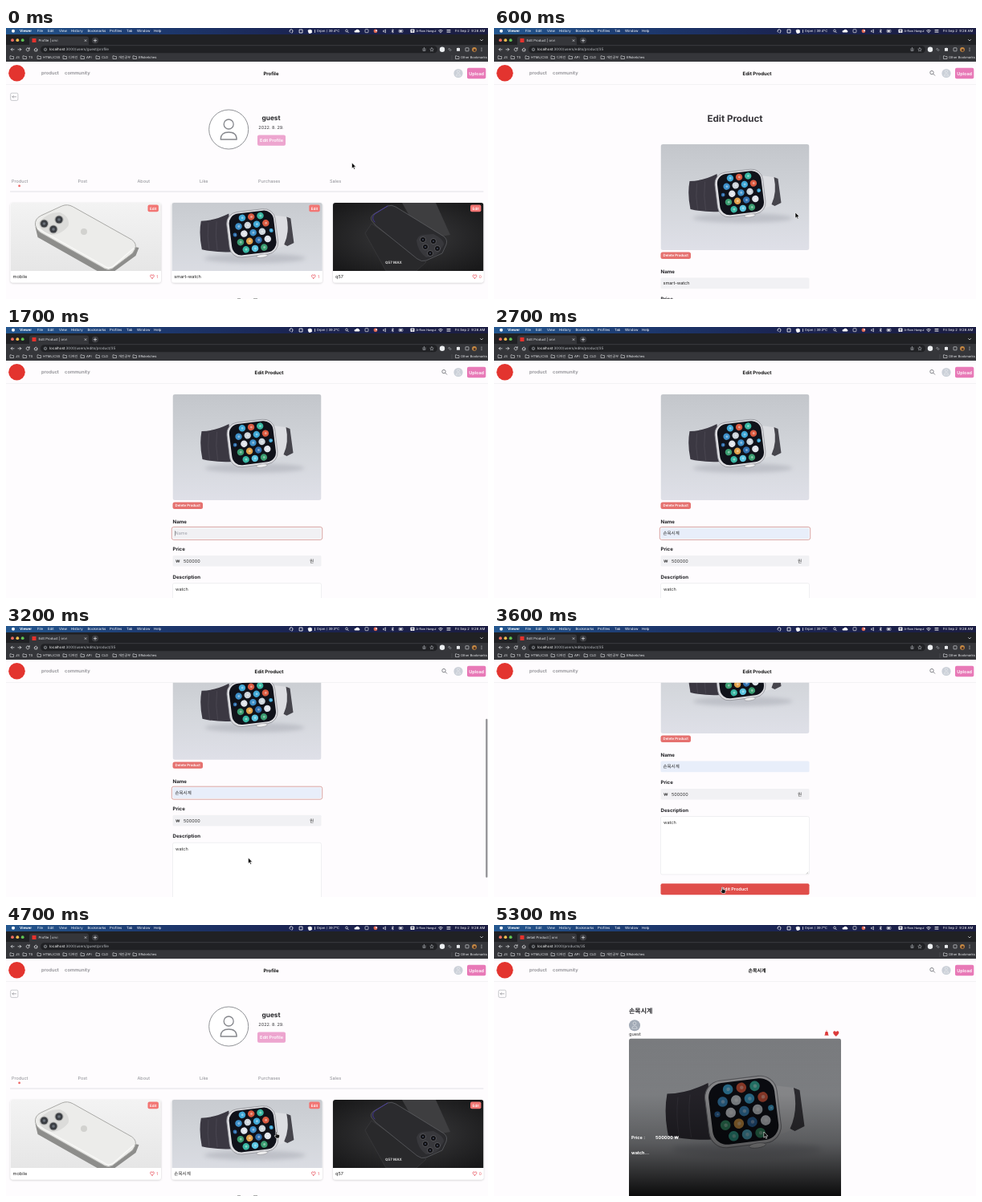
Animation of 600x338 px, one loop 5500 ms. Source, as an HTML page:

```html
<!DOCTYPE html>
<html lang="en">
<head>
<meta charset="utf-8">
<title>Shop profile demo</title>
<style>
  html, body { margin: 0; width: 100%; height: 100%; overflow: hidden; background: #fefcfe; }
  svg { display: block; width: 100vw; height: 100vh; font-family: Inter, "Noto Sans CJK KR", "Noto Sans CJK", sans-serif; }
  svg svg { width: auto; height: auto; }
  text { white-space: pre; text-rendering: geometricPrecision; }
  .b { font-weight: 700; }
  .s { font-weight: 600; }
  .m { text-anchor: middle; }
</style>
</head>
<body>
<svg id="stage" viewBox="0 0 600 338"></svg>
<script>
const LOOP = 5500, STEP = 100;
const stage = document.getElementById('stage');

const text = (x, y, size, fill, str, cls = '', id = '') =>
  `<text x="${x}" y="${y}" font-size="${size}" fill="${fill}" class="${cls}" id="${id}">${str}</text>`;
const rect = (x, y, w, h, fill, r = 0, extra = '') =>
  `<rect x="${x}" y="${y}" width="${w}" height="${h}" fill="${fill}" rx="${r}" ${extra}/>`;
const dot = (x, y, r, fill, extra = '') => `<circle cx="${x}" cy="${y}" r="${r}" fill="${fill}" ${extra}/>`;
const line = (d, stroke, w = .7, extra = '') =>
  `<path d="${d}" fill="none" stroke="${stroke}" stroke-width="${w}" stroke-linecap="round" stroke-linejoin="round" ${extra}/>`;
const shape = (d, fill, extra = '') => `<path d="${d}" fill="${fill}" ${extra}/>`;
const at = (x, y, body, scale = 1) => `<g transform="translate(${x} ${y}) scale(${scale})">${body}</g>`;
const stops = list => list.map(([o, c, a = 1]) => `<stop offset="${o}" stop-color="${c}" stop-opacity="${a}"/>`).join('');
const gradient = (id, ...list) => `<linearGradient id="${id}" x2="0" y2="1">${stops(list)}</linearGradient>`;
const heartPath = 'M0 2.3C-3.6-.2-2.4-2.4-1-2.1Q-.3-2 0-1.3Q.3-2 1-2.1C2.4-2.4 3.6-.2 0 2.3Z';
const person = (x, y, s) => at(x, y, dot(0, -6.5, 6, 'none', 'stroke="currentColor" stroke-width="1.3"') +
  line('M-10 12.5Q-10 3.5 0 3.5Q10 3.5 10 12.5Z', 'currentColor', 1.3), s);

// Photographs, reduced to flat shapes
function watchFace() {
  const colors = ['#3fa7d6', '#dfe3ea', '#3a9c70', '#d9593f', '#3d8fc9', '#e0a04a', '#38b6a2', '#ccd3da', '#2f6fae', '#5bc4e0'];
  let out = '';
  for (let row = -2; row <= 2; row++) {
    const count = row % 2 ? 4 : 3 + (row === 0) * 2;
    for (let i = 0; i < count; i++) {
      const x = (i - (count - 1) / 2) * 11.2, edge = Math.abs(x) > 20;
      const c = colors[(i * 3 + (row + 2) * 4) % colors.length];
      out += dot(x, row * 9.8, edge ? 2.4 : 4.2, c) + dot(x + .3, row * 9.8, edge ? .8 : 1.5, '#fff', 'opacity=".4"');
    }
  }
  return out;
}
const watchPhoto = rect(0, 0, 185, 133, 'url(#studio)') +
  '<ellipse cx="102" cy="92" rx="62" ry="6" fill="#9a9ca6" opacity=".4" filter="url(#blur)"/>' +
  shape('M124 39L141 41Q146 58 148 73L129 80Z', '#dcdde1') +
  shape('M141 41L146 43L150 73L142 77L138 75Q145 60 141 41Z', '#46454c') +
  shape('M36 46Q52 46 70 37L74 84Q54 85 37 81Q33 62 36 46Z', '#3b3842') +
  line('M45 49Q43 65 46 81M55 47Q53 64 56 82', '#524f5a', .6) +
  `<g transform="translate(99 61) rotate(-7)">${rect(-30, -28, 60, 56, '#dcdce0', 14, 'stroke="#88898f" stroke-width=".7"')}` +
  `${rect(-27, -26, 55, 51.5, '#10121a', 12)}${at(1, -.5, watchFace())}</g>` +
  '<ellipse cx="111" cy="89" rx="7" ry="2" fill="#eeeeef" stroke="#85868b" stroke-width=".5" transform="rotate(-8 111 89)"/>';

const lens = (x, y) => dot(x, y, 5.6, '#b0b0ae') + dot(x, y, 4.5, '#3b3e43') + dot(x, y, 1.8, '#697079');
const whitePhone = rect(0, 0, 187.5, 85, 'url(#pale)') +
  shape('M31 30L34 43L108 85H130L156 66L160 56L37 34Z', '#8d8d8b') +
  shape('M31 28Q30 20 38 16L64 4Q71 1 78 5L151 46Q158 51 155 58L152 63L127 82Q122 85 117 82L37 37Q32 33 31 28Z',
    '#ececea', 'stroke="#a9a9a6" stroke-width="1"') +
  line('M34 32L119 80Q123 82 128 79L153 57', '#fafaf8', 1.2) +
  shape('M35 25Q46 11 62 12Q75 18 72 29Q63 40 51 40Q37 36 35 25Z', '#dcdcda') +
  lens(42, 26) + lens(53.5, 33) + lens(60.5, 21) + dot(91.5, 36, 4, '#d2d2cf');
const blackPhone = rect(0, 0, 187.5, 85, 'url(#slate)') +
  shape('M86 0L128 0L146 40L112 46Z', '#3e3e40') +
  shape('M40 38L48 26L116 74L104 85L66 85Z', '#29292b', 'stroke="#4a4a4c" stroke-width=".4"') +
  text(65, 76, 4.5, '#d8d8d8', 'Q57 MAX', 'b') +
  shape('M48 22Q46 17 51 14L68 4Q73 2 78 5L138 42Q143 46 141 52L136 63L116 72Q110 74 105 70L53 28Z',
    '#2b2b2e', 'stroke="#5c5d61" stroke-width=".8"') +
  line('M52 24Q47 19 52 14L68 4', '#4b3bb0', .8) +
  shape('M104 47Q106 41 112 40L125 39Q138 45 138 52L132 62Q126 68 116 68Q105 60 104 47Z', '#38383c') +
  [[112, 46], [115, 55], [121, 63], [125, 48], [130, 57]].map(([x, y]) =>
    dot(x, y, 3.5, '#0f0f12', 'stroke="#77777c" stroke-width=".6"') + dot(x, y, 1.1, '#42485a')).join('');

function browser() {
  const menu = [['File', 39], ['Edit', 52], ['View', 66], ['History', 81], ['Bookmarks', 101.5], ['Profiles', 129],
    ['Tab', 150], ['Window', 163], ['Help', 184]];
  const marks = [['JS', 12], ['TS', 28], ['HTML/CSS', 46], ['디자인', 78], ['API', 100], ['CLD', 119], ['개인공부', 140], ['ERsketches', 165]];
  const folder = x => shape(`M${x} 34.8h1.7l.6.7h2.2v3h-4.5z`, 'none', 'stroke="#dadce0" stroke-width=".6"');
  const w = '#e8eaed', g = '#bdc1c6';
  const menuText = (x, size, str, cls, id) => text(x, 5.2, size, '#fff', str, cls, id);
  return rect(0, 0, 600, 8.5, 'url(#menu)') + dot(9, 3.7, 2, '#fff') + menuText(17, 4.4, 'Viewer', 'b') +
    menu.map(([s, x]) => menuText(x, 4.3, s)).join('') +
    line('M354 5.5a2 2 0 1 1 3-1.5l-1 2.2M365.5 2h3.5v4h-3.5zM377 6l-1-3 2-1 2.5 1-1 3z', '#fff', .8) +
    shape('M376 3l4-1 1 4-4 .5z', '#fff') + line('M384.5 2.5v3', '#fff') + menuText(387, 4.2, '', '', 'temp') +
    dot(424, 3.4, 1.4, 'none', 'stroke="#fff" stroke-width=".6"') + line('M425 4.5l1.3 1.3', '#fff') +
    shape('M434.5 5.6h5a1.3 1.3 0 0 0 0-2.5a2.3 2.3 0 0 0-4.2 0a1.3 1.3 0 0 0-.8 2.5z', '#fff') +
    rect(447, 1.7, 4, 4, 'none', .7, 'stroke="#fff" stroke-width=".6"') + dot(460, 3.8, 2.4, '#e46a52') + dot(461, 3.2, 1, '#dfe6ff') +
    line('M470 3.2h1l1.5-1.3v4L471 4.7h-1zM480 2.7l2.5 2.3-1.2 1v-4.4l1.2 1L480 5', '#fff', .6) +
    rect(489, 2.2, 5, 3.2, 'none', .7, 'stroke="#fff" stroke-width=".5"') + rect(489.8, 2.9, 3, 1.8, '#fff') +
    rect(503.5, 1.4, 5, 4.6, '#fff', .8) + text(506, 5, 3.4, '#1c2144', '한', 's m') +
    menuText(510.5, 3.7, 'A-Row Hangul') +
    line('M538.5 3.2q2.5-2 5 0M539.6 4.4q1.4-1 2.8 0', '#fff') + dot(541, 5.6, .6, '#fff') +
    line('M549 2.7h4M549 5h4', '#fff', 1) + menuText(559, 4.25, 'Fri Sep 2  9:26 AM') +
    rect(0, 8, 600, 13.5, '#202124') + dot(8, 15.2, 1.9, '#ed6a5e') + dot(14.3, 15.2, 1.9, '#f4bf4f') + dot(20.7, 15.2, 1.9, '#61c554') +
    rect(29, 10.5, 74, 13, '#35363a', 3) + rect(32.5, 13, 5, 5, '#e5322d') + text(40.5, 17.2, 4.2, w, '', '', 'tab') +
    line('M98 14.6l2 2M100 14.6l-2 2', w, .6) + dot(111, 15.6, 4.1, '#3a3b3f') + line('M109.3 15.6h3.4M111 13.9v3.4', w, .7) +
    line('M590.5 14.5l1.5 1.5 1.5-1.5', w) + rect(0, 21, 600, 21, '#35363a') +
    line('M10 26.8H6.2l1.6-1.6M6.2 26.8l1.6 1.6', w) + line('M15 26.8h3.8l-1.6-1.6M18.8 26.8l-1.6 1.6', w) +
    line('M29 26a2 2 0 1 0 .1 1.5M29.2 24.6V26h-1.4', w) + line('M35 27l2.2-2 2.2 2M35.8 26.6v2.3h2.8v-2.3', w) +
    rect(43, 22.3, 494, 9, '#202124', 4.5) + dot(49, 26.8, 1.7, 'none', `stroke="${g}" stroke-width=".6"`) +
    line('M49 26.6v1', g, .5) + text(54, 28.4, 4.5, g, '<tspan fill="#fff">localhost</tspan><tspan id="url"></tspan>') +
    line('M519 25.7v2.7h3v-2.7M520.5 27.3v-3', g, .6) +
    line('M530 24.6l.7 1.5 1.6.2-1.2 1.1.3 1.6-1.4-.8-1.4.8.3-1.6-1.2-1.1 1.6-.2z', g, .5) +
    dot(543, 26.8, 3.2, '#eceff1') + line('M552 25.5l2 2-1 1-2-2z', '#aeb3b8') + shape('M561 25h1.3a.8.8 0 0 1 1.5 0h1.2v3.8h-4z', w) +
    rect(572, 24.8, 4, 4, 'none', .4, `stroke="${w}" stroke-width=".6"`) + dot(583, 26.8, 2.9, '#c98a43') + dot(583.3, 27.5, 1.5, '#4e3426') +
    dot(592, 25, .5, w) + dot(592, 26.8, .5, w) + dot(592, 28.6, .5, w) +
    marks.map(([s, x]) => folder(x - 7) + text(x, 38, 4.1, w, s)).join('') +
    line('M555 34.5v5', '#66686c', .4) + folder(559.5) + text(566, 38, 4, w, 'Other Bookmarks');
}

function siteHeader() {
  return rect(0, 41.5, 600, 29, '#fefcfe') + line('M0 70.5H600', '#ececef', .6) + dot(13.5, 56.3, 10.3, '#e3342f') +
    text(44, 58.4, 5.8, '#8d8d92', 'product', 's') + text(73, 58.4, 5.8, '#8d8d92', 'community', 's') +
    text(330, 58.5, 6, '#111', '', 'b m', 'heading') +
    `<g id="search">${dot(545, 55.6, 2.2, 'none', 'stroke="#85868c" stroke-width="1"')}${line('M546.8 57.3l1.9 1.9', '#85868c', 1)}</g>` +
    dot(563, 56.5, 5.6, '#cbd0d8') + `<g color="#fff">${person(563, 56, .27)}</g>` +
    rect(574, 49.8, 23.3, 13.4, '#e879b7', 2) + text(585.6, 58.5, 5.5, '#fff', 'Upload', 's m');
}

const backButton = rect(5.7, 81.2, 9.2, 9.2, 'none', 1.5, 'stroke="#a5a8ae" stroke-width=".6"') +
  line('M12.5 85.8H8l1.3-1.3M8 85.8l1.3 1.3', '#777a80', .6);

function card(x, photo, name, likes, id) {
  return rect(x, 218, 187.5, 99.5, '#fff', 3, 'filter="url(#shadow)"') +
    `<g clip-path="url(#thumb)" transform="translate(${x} 218)">${photo}</g>` +
    rect(x + 171, 220.6, 13.4, 8.6, '#f27573', 2) + text(x + 177.7, 226.6, 4.6, '#fff', 'Edit', 's m') +
    text(x + 3, 312, 5.6, '#222', name, '', id) +
    at(x + 176.5, 310, line(heartPath, '#e8505b', .8)) + text(x + 181.7, 312, 5, '#e8505b', likes);
}

function profilePage() {
  const tabs = [['Product', 7], ['Post', 89.5], ['About', 163.5], ['Like', 241], ['Purchases', 314], ['Sales', 403]];
  return backButton + dot(277.2, 126.5, 24.5, '#fff', 'stroke="#85878c" stroke-width=".9"') + `<g color="#85878c">${person(277.2, 126.5, 1)}</g>` +
    text(330, 114.5, 8.3, '#27272a', 'guest', 'b m') + text(330, 125.6, 5.5, '#3a3a3e', '2022. 8. 29.', 'm') +
    rect(313, 133.6, 35, 13.2, '#eda5cf', 2) + text(330.5, 142.2, 5.5, '#fff', 'Edit Profile', 's m') +
    tabs.map(([s, x]) => text(x, 193, 5.5, '#8b8c92', s)).join('') + dot(16.6, 196.9, 1.4, '#ef6a6a') +
    line('M5.5 204H594', '#d3d5da', .7) +
    card(5.5, whitePhone, 'mobile', 1) + card(206.3, at(0, -24, watchPhoto, 1.014), 'smart-watch', 1, 'cardName') +
    card(407, blackPhone, 'q57', 0) + rect(288, 337, 4, 1, '#aaa') + rect(308, 337, 5, 1, '#aaa');
}

function editPage() {
  const label = (y, s) => text(207.5, y, 6.1, '#1f1f23', s, 'b');
  return text(300, 55.5, 11.6, '#39373c', 'Edit Product', 'b m') +
    `<g clip-path="url(#round)">${at(207.5, 84, watchPhoto)}</g>` +
    rect(207.5, 218.6, 37.5, 8.4, '#e5716f', 2.5) + text(226.2, 224.4, 4.4, '#fff', 'Delete Product', 's m') +
    label(245.2, 'Name') + rect(206.3, 249.4, 187.4, 16, '#fff', 2.5, 'stroke="#cf8d8c" stroke-width=".8" id="ring"') +
    rect(207.5, 250.5, 185, 13.8, '#f1f1f4', 1.5, 'id="field"') + rect(210, 253.8, 33, 7.2, '#b3d4fc', 0, 'id="selection"') +
    text(210.5, 259.4, 5.5, '#222', '', '', 'name') + rect(210.2, 254.2, .4, 6.4, '#222', 0, 'id="caret"') +
    label(279.2, 'Price') + rect(207.5, 285, 185, 13.6, '#f1f1f4', 1.5) + text(211.3, 293.8, 5.4, '#333', '₩') +
    text(221, 293.8, 5.5, '#333', '500000') + text(378, 293.8, 5.6, '#333', '원') +
    label(313.5, 'Description') + rect(207.5, 319.5, 185, 72.5, '#fff', 2, 'stroke="#e6e6ea" stroke-width=".6"') +
    text(211, 329, 5.5, '#333', 'watch') + line('M389 391l2-2M390.3 391l.7-.7', '#888', .4) +
    rect(207.5, 403.3, 185, 13.9, '#e04e4a', 2) + text(300, 412.2, 5.5, '#fff', 'Edit Product', 's m');
}

function detailPage() {
  return backButton + text(168, 110, 8, '#29292d', '손목시계', 'b') + dot(175, 125.2, 7, '#a2aab6') +
    `<g color="#fff">${person(175, 124.8, .32)}</g>` + text(168, 138, 5.6, '#333', 'guest') +
    shape('M411.5 137.7h5v-1h-.6v-2a1.9 1.9 0 0 0-3.8 0v2h-.6z', '#dd3b3b') + line('M414 131.6v.4', '#dd3b3b') +
    at(425.8, 135.5, shape(heartPath, '#dd3b3b'), 1.5) +
    `<g clip-path="url(#hero)">${at(161.5, 141.5, watchPhoto, 1.5)}${rect(168, 141.5, 264, 200, 'url(#dim)')}</g>` +
    text(171, 266.7, 5.5, '#fff', 'Price :', 'b') + text(201, 266.7, 5.5, '#fff', '500000 ₩', 'b') +
    text(171, 285.7, 5.5, '#fff', 'watch...', 'b');
}

const outline = 'stroke="#fff" stroke-width=".6" stroke-linejoin="round"';
stage.innerHTML = '<defs>' + gradient('studio', [0, '#c3c6cb'], [.55, '#d3d6db'], [1, '#dfe0e8']) +
  gradient('pale', [0, '#f3f3f3'], [1, '#e6e6e6']) +
  `<linearGradient id="menu">${stops([[0, '#24578f'], [.3, '#1d3a70'], [.6, '#1b2452'], [1, '#1b1d42']])}</linearGradient>` +
  `<radialGradient id="slate" r=".65">${stops([[0, '#3b3b3d'], [1, '#19191a']])}</radialGradient>` +
  gradient('dim', [0, '#000', .38], [.35, '#000', .4], [.65, '#000', .58], [1, '#000', .97]) +
  '<filter id="blur" x="-20%" y="-80%" width="140%" height="260%"><feGaussianBlur stdDeviation="2.5"/></filter>' +
  '<filter id="shadow"><feDropShadow dx="0" dy=".8" stdDeviation=".8" flood-opacity=".2"/></filter>' +
  `<clipPath id="thumb">${shape('M0 85V3Q0 0 3 0H184.5Q187.5 0 187.5 3V85Z', '#000')}</clipPath>` +
  `<clipPath id="round">${rect(207.5, 84, 185, 132, '#000', 3)}</clipPath>` +
  `<clipPath id="hero">${rect(168, 141.5, 264, 205, '#000', 3)}</clipPath></defs>` +
  rect(0, 0, 600, 338, '#fefcfe') +
  `<g id="profile">${profilePage()}</g><g id="edit">${editPage()}</g><g id="detail">${detailPage()}</g>` +
  siteHeader() + browser() + rect(597.2, 66, 2.2, 198, '#8e8e92', 1.1, 'id="bar"') +
  '<g id="cursor"><g id="arrow">' + shape('M0 0V7.2L1.7 5.7L2.8 8.3L4 7.8L2.9 5.2H5.1Z', '#000', outline) + '</g><g id="hand">' +
  shape('M0 .5Q.7-.5 1.3.5V3L4.2 3.6Q5 4 4.7 5.5L4 8H.6L-1.8 4.9Q-1.6 4 0 5Z', '#111', outline) + '</g><g id="beam">' +
  line('M-1 0Q0 0 0 1V7Q0 8-1 8M1 0Q0 0 0 1V7Q0 8 1 8', '#222', .6) + '</g></g>';

const ui = Object.fromEntries([...stage.querySelectorAll('[id]')].map(el => [el.id, el]));
const show = (el, on) => el.style.display = on ? '' : 'none';
const setText = (el, s) => { if (el.textContent !== s) el.textContent = s; };

const pages = {
  profile: { tab: 'Profile | orvi', url: ':3000/users/guest/profile', heading: 'Profile', center: 330 },
  edit: { tab: 'Edit Product | orvi', url: ':3000/users/edits/product/35', heading: 'Edit Product', center: 327.5 },
  detail: { tab: 'detail Product | orvi', url: ':3000/products/35', heading: '손목시계', center: 327.5 }
};
// Timelines: [ms, value...]
const route = [[0, 'profile'], [500, 'edit'], [4000, 'profile'], [5000, 'detail']];
const temps = [[0, '39.4'], [800, '39.5'], [1400, '39.2'], [2500, '39.3'], [3300, '39.7']];
const typed = [[0, 'smart-watch'], [1600, ''], [1900, 'ㅅ'], [2000, '소'], [2100, '손'], [2200, '손모'], [2400, '손목'], [2500, '손목시'], [2600, '손목시계']];
const pointer = [[0, 'arrow'], [400, 'hand'], [500, 'arrow'], [900, 'hand'], [1200, 'beam'], [1500, ''], [2900, 'arrow'],
  [3500, 'hand'], [4000, 'arrow'], [4600, 'hand'], [5000, 'arrow']];
const path = [[0, 430.5, 168], [400, 383, 223], [600, 375, 230], [1000, 313, 266], [1300, 313, 254], [2900, 318, 256],
  [3300, 296, 300], [3600, 283.5, 325.5], [4100, 283.5, 325.5], [4600, 374, 252], [4700, 335.8, 258], [5500, 335.8, 258]];
const scroll = [[0, 0], [700, 0], [1000, 36], [1200, 61], [2900, 61], [3400, 143], [5500, 143]];

const current = (list, t) => list.filter(([time]) => time <= t).pop()[1];
function tween(list, t, col = 1) {
  const i = Math.max(1, list.findIndex(([time]) => time >= t));
  const a = list[i - 1], b = list[i], k = (t - a[0]) / (b[0] - a[0]);
  return a[col] + (b[col] - a[col]) * k;
}

function draw(t) {
  const name = current(route, t), page = pages[name];
  for (const key in pages) show(ui[key], key === name);
  for (const key of ['tab', 'url', 'heading']) setText(ui[key], page[key]);
  ui.heading.setAttribute('x', page.center);
  show(ui.search, name !== 'profile');
  setText(ui.temp, `0rpm / ${current(temps, t)}°C`);
  setText(ui.cardName, t < 4000 ? 'smart-watch' : '손목시계');

  const y = tween(scroll, t);
  ui.edit.setAttribute('transform', `translate(0 ${61 - y})`);
  ui.bar.setAttribute('y', 42 + y * 296 / 442);
  show(ui.bar, (t >= 700 && t < 1400) || (t >= 2900 && t < 3500));

  const value = current(typed, t);
  setText(ui.name, value || 'Name');
  ui.name.setAttribute('fill', value ? '#222' : '#a0a3ab');
  ui.field.setAttribute('fill', t >= 2700 ? '#e8eefa' : '#f1f1f4');
  show(ui.ring, t >= 1400 && t < 3500);
  show(ui.selection, t === 1500);
  show(ui.caret, !value);

  const kind = current(pointer, t);
  for (const key of ['arrow', 'hand', 'beam']) show(ui[key], key === kind);
  ui.cursor.setAttribute('transform', `translate(${tween(path, t, 1)} ${tween(path, t, 2)})`);
}

const start = performance.now();
function tick() {
  const t = (performance.now() - start) % LOOP;
  draw(Math.floor(t / STEP) * STEP);
  requestAnimationFrame(tick);
}
tick();
</script>
</body>
</html>
```
